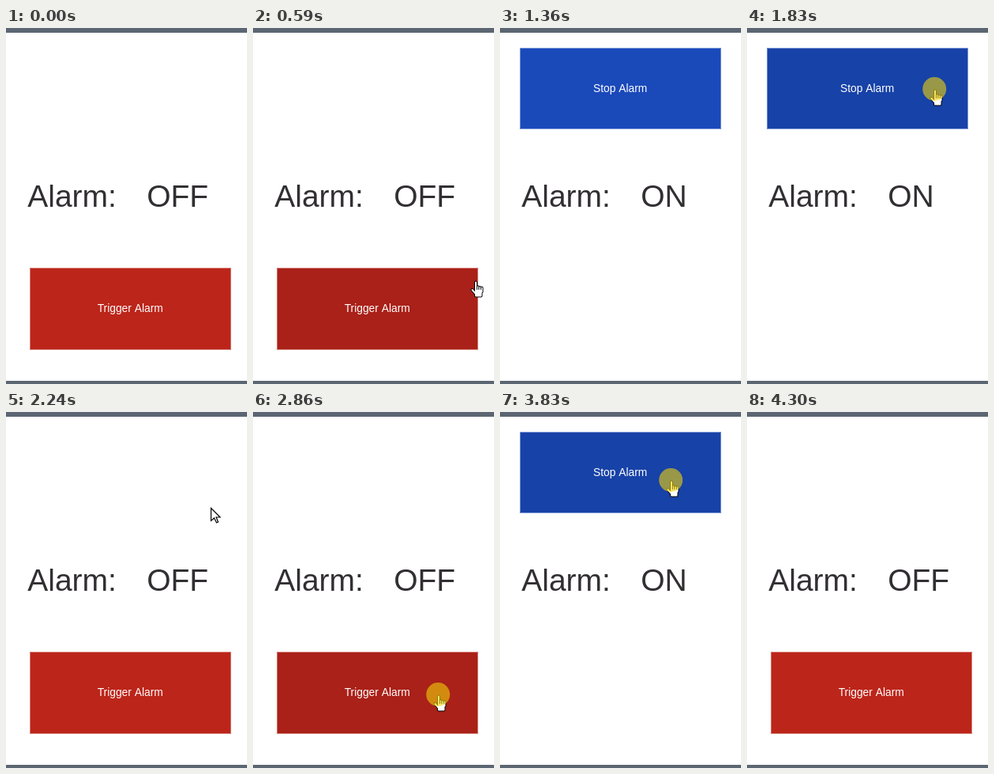
An HTML page with a canvas that plays this animation: 305 by 450 pixels, repeating every 5.23 s.

```html
<!DOCTYPE html>
<html lang="en">
<head>
<meta charset="utf-8">
<title>Alarm toggle</title>
<style>
  html, body { margin: 0; width: 100%; height: 100%; overflow: hidden; background: #fff; }
  canvas { display: block; }
</style>
</head>
<body>
<canvas id="stage" width="305" height="450"></canvas>
<script>
const ctx = document.getElementById('stage').getContext('2d');
const LOOP = 5230, TICK = 70, PRESS = 70;
const FONT = 'Arial, "Liberation Sans", sans-serif';
const INK = '#322f33';

const trigger = { x: 30, y: 303, w: 255, h: 104, label: 'Trigger Alarm', fill: '#bc251a', hover: '#a92118', edge: '#d5857b' };
const stop = { x: 25, y: 25, w: 255, h: 103, label: 'Stop Alarm', fill: '#1a49ba', hover: '#1742a7', edge: '#7f9bd8' };

const toggles = [870, 1900, 2930, 3900];

// Pointer strokes: a curve from one point to another, then rest until the next.
const strokes = [
  { at: 450, ticks: 6, from: [297, 302], via: [276, 330], to: [245, 337] },
  { at: 1220, ticks: 2, from: [265, 319], via: [272, 308], to: [279, 296], hide: 1360 },
  { at: 1560, ticks: 4, from: [258, 92], via: [248, 80], to: [237, 77], press: true },
  { at: 2100, ticks: 10, from: [243, 83], via: [318, 236], to: [234, 357], press: true },
  { at: 3200, ticks: 9, from: [246, 338], via: [335, 8], to: [216, 86], press: true },
  { at: 4230, ticks: 1, from: [228, 78], via: [228, 78], to: [228, 78], hide: 4300 }
];

const ease = u => u * u * (3 - 2 * u);
const curve = (a, b, c, u) => (1 - u) ** 2 * a + 2 * u * (1 - u) * b + u * u * c;
const activeAt = t => toggles.filter(s => s <= t).length % 2 ? stop : trigger;
const inside = (b, x, y) => x >= b.x && x < b.x + b.w && y >= b.y && y < b.y + b.h;

function pointerAt(t) {
  const s = strokes.filter(s => s.at <= t).pop();
  if (!s || t >= s.hide) return null;
  const last = s.ticks - 1;
  const k = Math.min(Math.floor((t - s.at) / TICK), last);
  const u = ease(k / Math.max(last, 1));
  const [x, y] = [0, 1].map(i => Math.round(curve(s.from[i], s.via[i], s.to[i], u)));
  const button = activeAt(s.at + k * TICK);
  const pressed = s.press && toggles.some(c => t >= c - PRESS && t < c);
  return { x, y, pressed, target: inside(button, x, y) ? button : null };
}

function text(str, x, y, size, color, align) {
  ctx.font = `${size}px ${FONT}`;
  ctx.textAlign = align;
  ctx.fillStyle = color;
  ctx.fillText(str, x, y);
}

function drawButton(b, hovered) {
  ctx.fillStyle = hovered ? b.hover : b.fill;
  ctx.fillRect(b.x, b.y, b.w, b.h);
  ctx.strokeStyle = b.edge;
  ctx.lineWidth = 1;
  ctx.strokeRect(b.x + 0.5, b.y + 0.5, b.w - 1, b.h - 1);
  text(b.label, b.x + b.w / 2 - 0.3, b.y + 56, 13.8, '#fff', 'center');
}

function drawArrow() {
  ctx.beginPath();
  for (const [x, y] of [[0, 0], [0, 16], [4, 12.5], [7, 18.5], [9, 17.5], [6.5, 11.5], [11.5, 11.5]]) ctx.lineTo(x, y);
  ctx.closePath();
  ctx.fillStyle = '#fff';
  ctx.fill();
  ctx.strokeStyle = '#000';
  ctx.lineWidth = 1.2;
  ctx.stroke();
}

function drawHand() {
  const line = (x1, y1, x2, y2) => { ctx.moveTo(x1, y1); ctx.lineTo(x2, y2); };
  ctx.lineCap = ctx.lineJoin = 'round';
  // A black pass makes the outline, a thinner white pass the skin.
  for (const [color, width] of [['#000', 4], ['#fff', 2]]) {
    ctx.strokeStyle = ctx.fillStyle = color;
    ctx.lineWidth = width;
    ctx.beginPath();
    line(-4, 11.5, 0, 16);
    for (let i = 0; i < 4; i++) line(0.5 + 2.5 * i, i ? 7 + i * 0.7 : 2, 0.5 + 2.5 * i, 14);
    ctx.rect(0.5, 12, 6.5, 7);
    ctx.fill();
    ctx.stroke();
  }
  ctx.strokeStyle = '#000';
  ctx.lineWidth = 0.8;
  ctx.beginPath();
  for (let i = 0; i < 3; i++) line(1.9 + 2.5 * i, 7 + i * 0.7, 1.9 + 2.5 * i, 11);
  ctx.stroke();
}

function drawPointer(p) {
  ctx.save();
  ctx.translate(p.x + 0.5, p.y + 0.5);
  p.target ? drawHand() : drawArrow();
  ctx.restore();
  if (!p.pressed) return;
  ctx.fillStyle = 'rgba(240, 210, 10, 0.6)';
  ctx.beginPath();
  ctx.arc(p.x + 0.2, p.y, 15, 0, Math.PI * 2);
  ctx.fill();
}

function draw(t) {
  const button = activeAt(t);
  const pointer = pointerAt(t);
  ctx.fillStyle = '#fff';
  ctx.fillRect(0, 0, 305, 450);
  ctx.fillStyle = '#5b6672';
  ctx.fillRect(0, 0, 305, 6);
  ctx.fillRect(0, 446, 305, 4);

  text('Alarm:', 27.2, 226, 39, INK, 'left');
  text(button === stop ? 'ON' : 'OFF', 178.2, 226, 39, INK, 'left');
  drawButton(button, pointer && pointer.target === button);
  if (pointer) drawPointer(pointer);
}

const start = performance.now();
function frame() {
  draw((performance.now() - start) % LOOP);
  requestAnimationFrame(frame);
}
frame();
</script>
</body>
</html>
```
